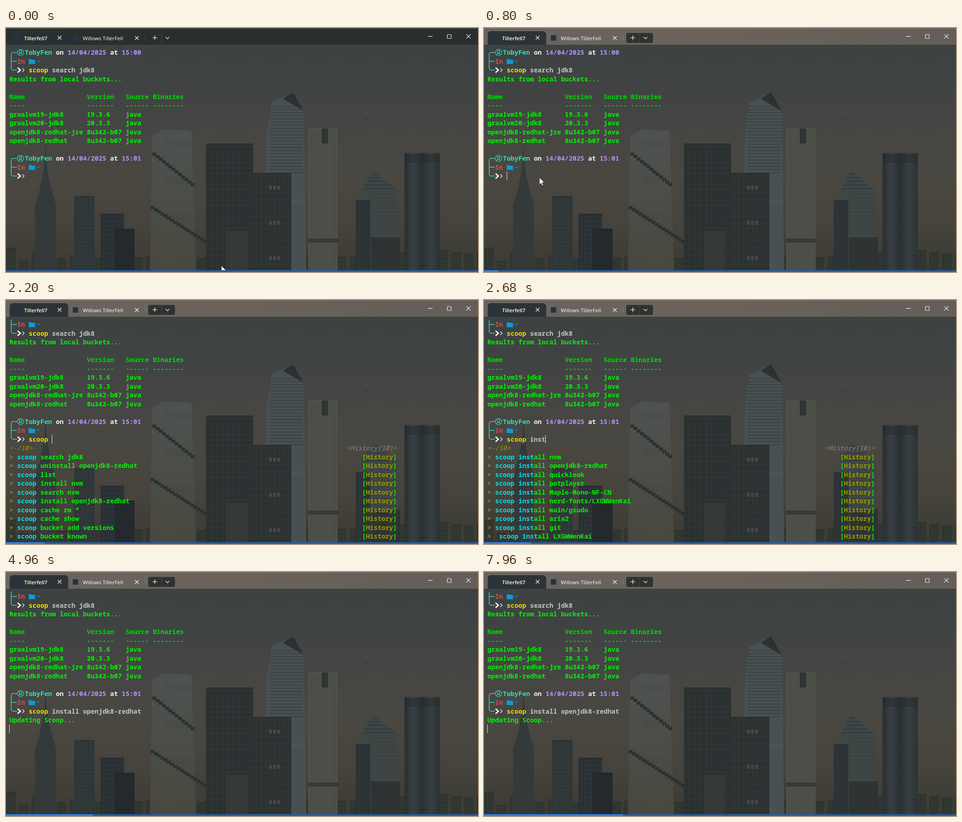
Recreate the animation shown at these times as an HTML page with a canvas. Size 1039 by 539 pixels, loop 8000 ms.

```html
<!DOCTYPE html>
<html lang="en">
<head>
<meta charset="utf-8">
<title>Terminal</title>
<style>
html, body { margin: 0; width: 100%; height: 100%; overflow: hidden; background: #414443; }
canvas { display: block; }
</style>
</head>
<body>
<canvas id="stage" width="1039" height="539"></canvas>
<script>
const W = 1039, H = 539, LOOP = 8000;
const CELL = 8.532, ROW = 19.5, LEFT = 7.4, TOP = 54;
const MONO = '14.22px "Noto Sans Mono", "DejaVu Sans Mono", monospace';
const UI = '"Open Sans", "Noto Sans", sans-serif';
const GREEN = '#00f500', HEADER = '#00d800', TEAL = '#32dfb5', WHITE = '#f4f4f4',
      PURPLE = '#b591f5', YELLOW = '#e6e000', GREY = '#c3c5c4', OLIVE = '#9c9a00',
      CYAN = '#00dfe3', RED = '#e84a50', BLUE = '#0b9bd8', SKY = '#3d4242';

const FOCUS = 600, TYPE = 1240, KEY = 140, ACCEPT = 3500, ENTER = 3900, UPDATE = 4600;
const PREFIX = 'scoop install ', FULL = PREFIX + 'openjdk8-redhat';
const recent = ['search jdk8', 'uninstall openjdk8-redhat', 'list', 'install nvm',
  'search nvm', 'install openjdk8-redhat', 'cache rm *', 'cache show',
  'bucket add versions', 'bucket known'].map(s => 'scoop ' + s);
const installs = ['nvm', 'openjdk8-redhat', 'quicklook', 'potplayer', 'Maple-Mono-NF-CN',
  'nerd-fonts/LXGWWenKai', 'main/gsudo', 'aria2', 'git'].map(s => PREFIX + s)
  .concat(' ' + PREFIX + 'LXGWWenKai');
const packages = [
  'graalvm19-jdk8      19.3.6    java',
  'graalvm20-jdk8      20.3.3    java',
  'openjdk8-redhat-jre 8u342-b07 java',
  'openjdk8-redhat     8u342-b07 java'
];
const heading = 'Name                Version   Source Binaries';

const stage = document.getElementById('stage').getContext('2d');
const skyline = document.createElement('canvas');
skyline.width = W;
skyline.height = H;
let g = skyline.getContext('2d');

function box(x, y, w, h, color) {
  g.fillStyle = color;
  g.fillRect(x, y, w, h);
}

function path(...p) {
  g.beginPath();
  for (let i = 0; i < p.length; i += 2) g.lineTo(p[i], p[i + 1]);
}

function shape(color, ...p) {
  path(...p);
  g.closePath();
  g.fillStyle = color;
  g.fill();
}

function line(color, width, ...p) {
  path(...p);
  g.strokeStyle = color;
  g.lineWidth = width;
  g.stroke();
}

function panel(x, y, w, h, r, color) {
  g.beginPath();
  g.roundRect(x, y, w, h, r);
  g.fillStyle = color;
  g.fill();
}

function fade(x0, y0, x1, y1, ...colors) {
  const f = g.createLinearGradient(x0, y0, x1, y1);
  colors.forEach((c, i) => f.addColorStop(i / (colors.length - 1), c));
  return f;
}

// Block down to the ground, with columns every dx and floors every dy (0 for none).
function tower(x, y, w, color, dx, dy, ink = 'rgba(150,160,160,.08)') {
  box(x, y, w, H - y, color);
  for (let i = x + dx; dx && i < x + w; i += dx) box(i, y + 6, 1, H, ink);
  for (let j = y + 6; dy && j < H; j += dy) box(x, j, w, 1, ink);
}

// Tapered top: floors from a flat or pointed edge down to the full width.
function crown(color, apexX, apexY, x, w, baseY) {
  shape(color, apexX, apexY, x + w, baseY, x + w + 4, H, x, H, x, baseY);
  for (let y = apexY + 9; y < baseY; y += 8) {
    const k = (y - apexY) / (baseY - apexY);
    box(apexX + (x - apexX) * k, y, w * k, 1.5, 'rgba(22,28,30,.4)');
  }
}

function paintSkyline() {
  const shade = 'rgba(20,26,28,.2)', dark = '#2c3132';
  box(0, 0, W, H, fade(0, 37, 0, H, SKY, '#414343', '#464644', '#494740', '#45433b', '#3b3a33'));
  line('#303536', 1, 786, 201, 799, 202);

  let seed = 7;
  const rnd = () => (seed = seed * 16807 % 2147483647) / 2147483647;
  for (let x = 0; x < W; x += 28) tower(x, 485 + rnd() * 32, 22, '#30342f', 7, 9);

  // spire
  for (let y = 262; y < H; y += 3) {
    const half = Math.min(23, 1 + 22 * ((y - 262) / 126) ** 2);
    box(87 - half, y, half * 2, 3, '#34393a');
  }

  tower(150, 371, 45, '#2e3536', 9, 8);
  tower(208, 410, 52, '#293034', 7, 10);
  tower(239, 443, 44, '#23292c', 0, 0);

  // pale tower with stepped terraces
  shape(fade(0, 224, 0, H, '#4e5250', '#4c4d47', '#484740'),
    322, 239, 347, 224, 408, 227, 418, H, 317, H);
  for (let x = 350; x < 408; x += 5)
    for (const y of [246, 328, 408]) box(x, y, 1, 18, shade);
  for (let i = 0; i < 17; i++) {
    if (i < 13) box(322 + i * 7, 275 + i * 5.6, 9, 7, dark);
    box(318 + i * 7.2, 393 + i * 4.7, 9, 7, dark);
  }

  tower(440, 255, 104, '#2b3031', 12, 12);
  tower(484, 448, 48, '#353936', 12, 0);

  // slanted tower with a dark facet
  shape('#485052', 574, 240, 583, 165, 632, 142, 655, 183, 661, H, 570, H);
  for (let y = 172; y < 320; y += 7) box(580, y, 74, 1.5, 'rgba(24,30,32,.4)');
  shape(dark, 609, 156, 632, 142, 655, 183);
  for (let x = 629; x < 660; x += 4) box(x, 377, 1, 12, '#555d5e');

  tower(541, 320, 87, dark, 10, 13);
  for (let y = 348; y < H; y += 78)
    for (let i = 0; i < 3; i++) box(579 + i * 9, y, 6, 9, '#454943');

  tower(665, 221, 65, '#4e504a', 6, 0, shade);
  box(695, 222, 14, 33, '#2f3434');
  box(665, 465, 67, 9, '#363a33');

  crown('#3f4646', 808, 313, 783, 78, 358);
  for (let y = 366; y < 500; y += 8) box(803, y, 60, 1, shade);
  tower(770, 380, 32, '#2c3335', 8, 0);
  box(803, 463, 64, 76, 'rgba(30,34,33,.5)');

  tower(877, 276, 78, fade(877, 0, 955, 0, '#293034', '#394144', '#2b3235', '#394143', '#2c3335'),
    6, 22, shade);
  box(878, 278, 76, 20, shade);
}

const rowY = row => TOP + row * ROW;
const colX = col => LEFT + col * CELL;

function put(col, row, text, color, style = '600') {
  g.font = style + ' ' + MONO;
  g.fillStyle = color;
  g.fillText(text, colX(col), rowY(row) + 5.2);
}

function command(row, text) {
  const word = text.split(' ')[0];
  put(5, row, word, YELLOW);
  put(5 + word.length, row, text.slice(word.length), GREY);
}

function prompt(row, time) {
  const y = rowY(row), mid = y + ROW, end = mid + ROW;
  g.beginPath();
  g.moveTo(24, y);
  g.arcTo(11.5, y, 11.5, mid, 4);
  g.arcTo(11.5, end, 24, end, 4);
  g.lineTo(24, end);
  g.moveTo(11.5, mid);
  g.lineTo(24, mid);
  g.strokeStyle = TEAL;
  g.lineWidth = 1.5;
  g.stroke();

  // user badge
  g.lineWidth = 1.2;
  g.beginPath();
  g.arc(32, y, 7, 0, 7);
  g.moveTo(34.8, y - 1.5);
  g.arc(32, y - 1.5, 2.8, 0, 7);
  g.moveTo(27.5, y + 5);
  g.quadraticCurveTo(32, y - 1, 36.5, y + 5);
  g.stroke();

  put(4, row, 'TobyFen', TEAL);
  put(12, row, 'on', WHITE);
  put(15, row, '14/04/2025', PURPLE);
  put(26, row, 'at', WHITE);
  put(29, row, time, PURPLE);
  put(2, row + 1, 'In', RED);
  put(7, row + 1, '~', BLUE);
  panel(50, mid - 5, 6, 5, 1, BLUE);
  panel(50, mid - 3.5, 14, 9.5, 1, BLUE);
  line(WHITE, 3, 25.5, end - 5.5, 31.5, end, 25.5, end + 5.5);
  line(WHITE, 1.3, 36, end - 4, 40, end, 36, end + 4);
}

function results(row) {
  put(0, row, 'Results from local buckets...', GREEN);
  put(0, row + 2, heading, HEADER);
  put(0, row + 3, heading.replace(/\w/g, '-'), HEADER);
  packages.forEach((text, i) => put(0, row + 4 + i, text, GREEN));
}

function history(row, typed) {
  put(0, row, '<-/10>', OLIVE, 'italic 500');
  put(87, row, '<History(10)>', '#858786', 'italic 500');
  (typed.length > 6 ? installs : recent).forEach((text, i) => {
    const r = row + 1 + i, cut = text.indexOf(typed) + typed.length;
    put(0, r, '>', OLIVE);
    put(2, r, text.slice(0, cut), CYAN);
    put(2 + cut, r, text.slice(cut), GREEN);
    put(91, r, '[       ]', GREEN);
    put(92, r, 'History', OLIVE);
  });
}

function cross(x, y, r) {
  line('#f0f0f0', 1.2, x - r, y - r, x + r, y + r);
  line('#f0f0f0', 1.2, x - r, y + r, x + r, y - r);
}

function titleBar(focused) {
  const ink = '#f0f0f0';
  box(0, 0, W, 37, focused ? fade(0, 0, W, 0, '#6b645e', '#6a625b', '#655e58') : '#2b2e2e');
  box(0, 0, W, 1, focused ? '#7d766f' : '#686a69');
  panel(8, 7, 129, 32, [7, 7, 0, 0], focused ? '#2d3335' : '#293032');
  box(0, 37, W, 2, SKY);
  if (focused) panel(313, 11, 59, 22, 4, '#303231');
  box(306, 15, 1, 14, focused ? '#837c75' : '#484b4b');
  box(342, 11, 1, 22, '#484b4a');
  for (const x of [18, 147]) box(x, 16, 12, 12, '#20344d');
  g.fillStyle = '#fff';
  g.font = '600 11.4px ' + UI;
  g.fillText('Tillerfell7', 40, 26.5);
  g.font = '11.6px ' + UI;
  g.fillText('Willows TillerFell', 169, 26.7);
  cross(118, 21.5, 4);
  cross(288, 22, 4);
  cross(1018, 18.5, 4.7);
  line(ink, 1.2, 322.5, 21.5, 332.5, 21.5);
  line(ink, 1.2, 327.5, 16.5, 327.5, 26.5);
  line(ink, 1.2, 351.5, 20, 355.5, 24, 359.5, 20);
  line(ink, 1.2, 929, 18.5, 939, 18.5);
  g.beginPath();
  g.roundRect(971.5, 14.5, 8.5, 8.5, 1);
  g.stroke();
}

function pointer(t) {
  const k = Math.min(1, t / FOCUS), e = k * k * (3 - 2 * k);
  g.save();
  g.translate(474 - 352 * e, 525 - 194.5 * e);
  g.lineJoin = 'round';
  shape('#fff', 0, 0, 0, 15.5, 3.6, 12.2, 6, 17.5, 8.6, 16.4, 6.3, 11.2, 11, 11);
  g.strokeStyle = '#222';
  g.lineWidth = .8;
  g.stroke();
  g.restore();
}

function draw(now) {
  const t = now % LOOP;
  const count = Math.min(PREFIX.length, Math.max(0, Math.floor((t - TYPE) / KEY)));
  const typed = t < ACCEPT ? PREFIX.slice(0, count) : FULL;
  const shift = count ? 1 : 0;
  const inputRow = 14 - shift;

  g.drawImage(skyline, 0, 0);
  g.save();
  g.beginPath();
  g.rect(0, 44, W, H - 44);
  g.clip();
  prompt(-shift, '15:00');
  command(2 - shift, 'scoop search jdk8');
  results(3 - shift);
  prompt(12 - shift, '15:01');
  command(inputRow, typed);
  if (count && t < ACCEPT) history(inputRow + 1, typed);
  if (t >= UPDATE) put(0, 14, 'Updating Scoop...', GREEN);
  g.restore();

  // the caret blink restarts at each event
  const lastKey = count ? TYPE + count * KEY : FOCUS;
  const since = [UPDATE, ENTER, ACCEPT, lastKey].find(s => t >= s);
  if ((t - since) % 1060 < 530) {
    const row = t >= UPDATE ? 15 : t >= ENTER ? 14 : inputRow;
    const col = t >= ENTER ? 0 : 5 + typed.length;
    box(Math.round(colX(col)), Math.round(rowY(row) - 10), 1, 19, '#e8e8e8');
  }

  titleBar(t >= FOCUS);
  if (!count) pointer(t);
  box(0, 535, W, 4, '#2b5c9e');
  box(0, 535, t * .0385, 4, '#2f7ee6');
}

paintSkyline();
g = stage;
const start = performance.now();
function tick() {
  draw(performance.now() - start);
  requestAnimationFrame(tick);
}
tick();
</script>
</body>
</html>
```
